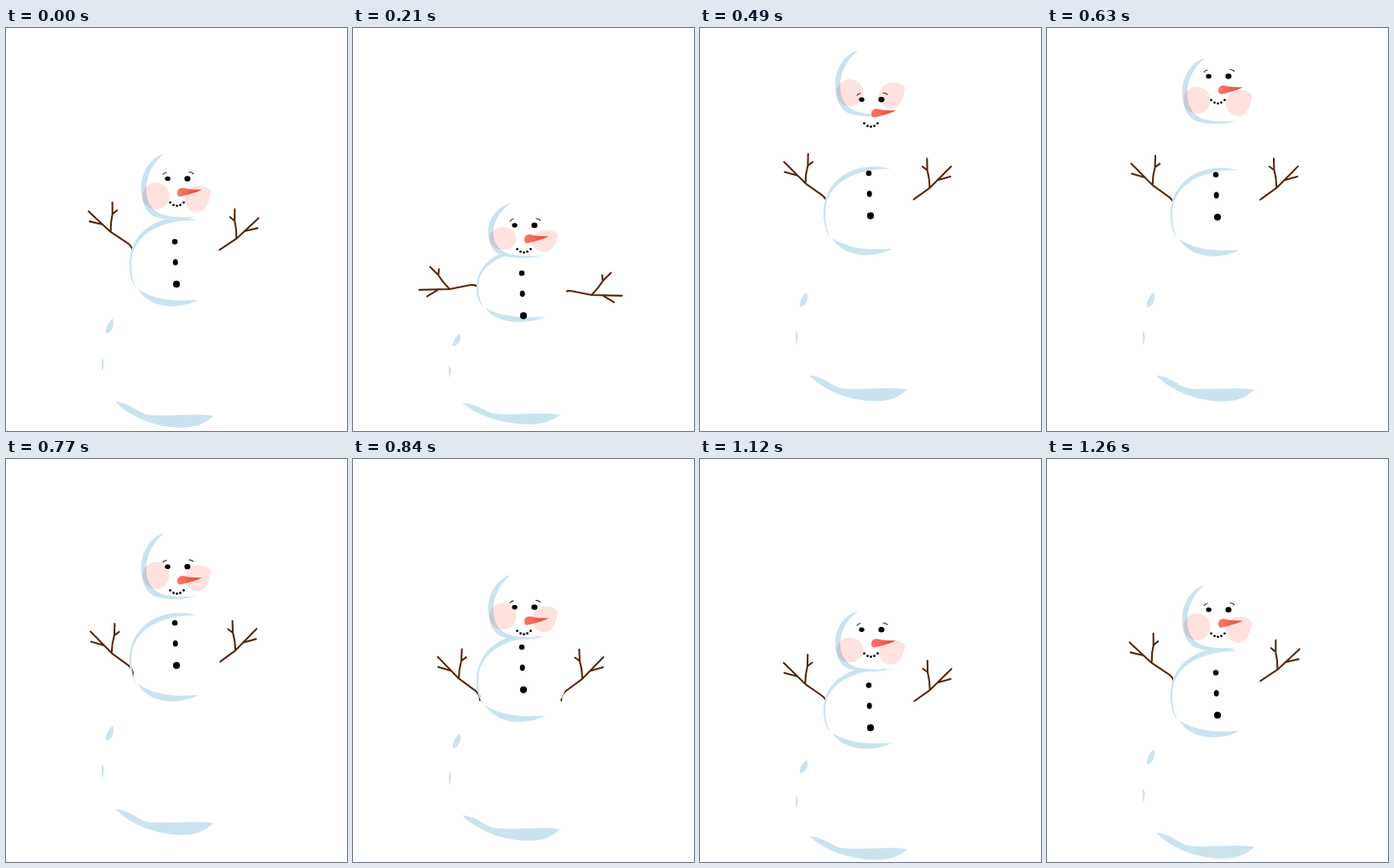
These frames come from a looping animation (406x480 px, 1820 ms). An HTML page with a canvas:

```html
<!DOCTYPE html>
<html lang="en">
<head>
<meta charset="utf-8">
<title>Jumping snowman</title>
<style>
html, body { margin: 0; width: 100%; height: 100%; overflow: hidden; background: #fff; }
canvas { display: block; }
</style>
</head>
<body>
<canvas id="stage" width="406" height="480"></canvas>
<script>
const ctx = document.getElementById("stage").getContext("2d");
const STEP = 70, CROUCH = 3, LAND = 14, REST = 18, LOOP = 1820;
const SNOW = "#fff", SHADE = "#cbe3ef", BLUSH = "#fde2df", BARK = "#54270b", INK = "#000";

const clamp = u => Math.max(0, Math.min(1, u));
const ease = u => (1 - Math.cos(Math.PI * clamp(u))) / 2;
const mix = (a, b, u) => a + (b - a) * u;

// Rest, crouch, leap, land, rest. A part reaches its top at step `up` and leaves it at `drop`.
function jump(rest, crouch, top, land, up, drop = up, accel = 1) {
  return step => {
    if (step < CROUCH) return mix(rest, crouch, ease(step / CROUCH));
    if (step < up) return mix(crouch, top, ease((step - CROUCH) / (up - CROUCH)));
    if (step < LAND) return mix(top, land, ease(clamp((step - drop) / (LAND - drop)) ** accel));
    return mix(land, rest, ease((step - LAND) / (REST - LAND)));
  };
}

const motion = {
  head: jump(150, 209, 27, 213, 6, 6, 2),
  eyes: jump(179.5, 235, 54, 227, 8.5),
  buttons: jump(254.5, 292, 173, 284.5, 6, 6, 2.6),
  middle: jump(224, 261, 163, 269, 5.25, 5.25, 3.1),
  baseBottom: jump(476, 472, 444.5, 479, 5, 5, 4),
  leftArm: jump(267.5, 310, 210.5, 319, 6, 8.5),
  rightArm: jump(275.5, 317, 216, 325.5, 6, 9),
  lift: jump(43, -1.5, 45, 46, 6.5),
  squash: jump(1, 0.83, 1, 0.835, 5.5, 11.5)
};

const shapes = {
  headShade: "M188 0C174 3 161 20 161 40C161 60 168 71 178 75C195 80 212 79 229 74C212 77 192 75 183 71C172 66 167 55 167 42C167 26 175 10 188 0Z",
  rightCheek: "M213 54C213 44 222 37 231 38C237 38 242 41 244 44C243 56 238 69 228 69C219 69 213 62 213 54Z",
  midShade: "M227 5C190 -6 147 14 147 58C147 70 150 80 155 87C150 74 148 62 150 48C155 22 184 4 227 5ZM157 87C172 111 205 112 229 100C205 101 180 102 157 87Z",
  baseShade: "M127 0C121 5 118 13 119 18C126 17 130 8 127 0ZM114 46C118 50 117 58 114 63ZM130 99C148 101 155 110 166 114C185 118 220 112 247 116C236 126 225 130 209 130C180 130 148 118 130 99Z",
  nose: "M204 17C204 12 207 11 211 11C219 13 226 13 233 13C226 17 216 19 209 21C205 22 204 20 204 17Z",
  brows: "M187 -5Q188 -7 191 -7.5M218 -8Q221 -8 223 -6",
  arm: "M0 0Q4 -5 12 -4L36 0L72 0M36 0Q44 -8 49 -17L58.5 -27M49 -17L48 -24M49 0L63 8"
};
for (const name in shapes) shapes[name] = new Path2D(shapes[name]);

const noseColor = ctx.createLinearGradient(204, 0, 233, 0);
noseColor.addColorStop(0, "#fb7867");
noseColor.addColorStop(1, "#ea4534");

function fill(shape, color) {
  ctx.fillStyle = color;
  ctx.fill(shape);
}

function stroke(shape, color, width) {
  ctx.strokeStyle = color;
  ctx.lineWidth = width;
  ctx.stroke(shape);
}

function oval(x, y, rx, ry, color) {
  ctx.fillStyle = color;
  ctx.beginPath();
  ctx.ellipse(x, y, rx, ry, 0, 0, Math.PI * 2);
  ctx.fill();
}

function part(y, squash, draw) {
  ctx.save();
  ctx.translate(0, y);
  ctx.scale(1, squash);
  draw();
  ctx.restore();
}

function drawArm(x, y, side, lift) {
  ctx.save();
  ctx.translate(x, y);
  ctx.scale(side, 1);
  ctx.rotate(-lift * Math.PI / 180);
  stroke(shapes.arm, BARK, 2.1);
  ctx.restore();
}

function drawMiddle() {
  oval(201.5, 53, 53.5, 52.5, SNOW);
  fill(shapes.midShade, SHADE);
}

function drawHead() {
  oval(202, 39, 40, 38.5, SNOW);
  fill(shapes.headShade, SHADE);
  ctx.globalCompositeOperation = "multiply";
  oval(178.5, 50, 16, 16, BLUSH);
  fill(shapes.rightCheek, BLUSH);
}

function drawButtons() {
  oval(201, 0, 3.3, 3.2, INK);
  oval(201.7, 24.5, 3, 3.8, INK);
  oval(203, 50.7, 4.1, 4.1, INK);
}

function drawFace() {
  stroke(shapes.brows, "#333", 1.2);
  oval(192.5, 0, 3.2, 2.8, INK);
  oval(216, 0, 3.6, 3.3, INK);
  fill(shapes.nose, noseColor);
  for (let i = -2; i <= 2; i++) oval(203.5 + 4 * i, 32.3 - i * i, 1.4, 1.4, INK);
}

function render(now) {
  const step = Math.min(REST, Math.floor((now % LOOP) / STEP));
  const pose = {};
  for (const name in motion) pose[name] = motion[name](step);
  const { squash, lift } = pose;

  ctx.fillStyle = SNOW;
  ctx.fillRect(0, 0, 406, 480);
  ctx.lineCap = ctx.lineJoin = "round";

  part(pose.baseBottom - 130 * squash, squash, () => fill(shapes.baseShade, SHADE));
  drawArm(151, pose.leftArm, -1, lift);
  drawArm(248, pose.rightArm, 1, lift);
  part(pose.middle, squash, drawMiddle);
  part(pose.head, squash, drawHead);
  part(pose.buttons, 1, drawButtons);
  part(pose.eyes, 1, drawFace);
}

function tick(now) {
  render(now);
  requestAnimationFrame(tick);
}
render(0);
requestAnimationFrame(tick);
</script>
</body>
</html>
```
